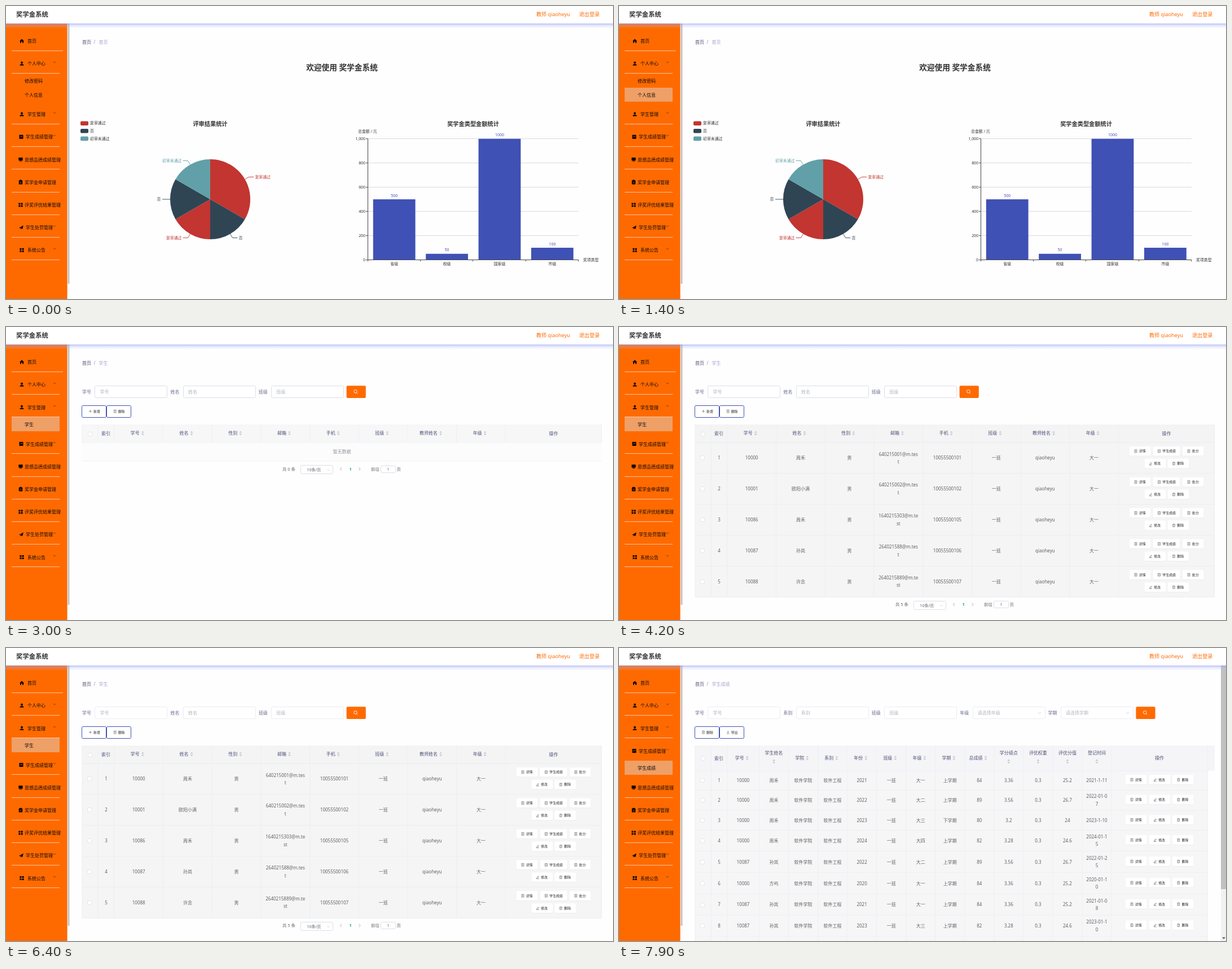
Recreate the animation shown at these times as an HTML page. Size 1076 px wide and 520 px high, loop 8 s.

```html
<!DOCTYPE html>
<html lang="zh-CN">
<head>
<meta charset="utf-8">
<title>奖学金系统</title>
<style>
html,body{margin:0;width:100%;height:100%;overflow:hidden;background:#fefefe}
svg{display:block}
text{font-family:'Noto Sans','Noto Sans CJK SC','Noto Sans CJK',sans-serif;white-space:pre}
</style>
</head>
<body>
<svg id="stage" width="1076" height="520" viewBox="0 0 1076 520"></svg>
<script>
const stage = document.getElementById('stage');
const LOOP = 8000, ORANGE = '#ff6a00', BLUE = '#3f51b5', GREY = '#606266', EDGE = '#dcdfe6', HINT = '#b2b5bc';
const USER = 'qiaoheyu';
const clamp = v => Math.max(0, Math.min(1, v));
const ease = v => { v = clamp(v); return v * v * (3 - 2 * v); };

// Drawing helpers; text is placed by its vertical centre.
const text = (s, x, y, fill = GREY, size = 8, anchor = 'start', weight = 400) =>
  `<text x="${x}" y="${y + size * .37}" fill="${fill}" font-size="${size}" text-anchor="${anchor}" font-weight="${weight}">${s}</text>`;
const mid = (s, x, y, fill, size, weight) => text(s, x, y, fill, size, 'middle', weight);
const end = (s, x, y, fill, size) => text(s, x, y, fill, size, 'end');
const rect = (x, y, w, h, fill, extra = '') =>
  `<rect x="${x}" y="${y}" width="${w}" height="${h}" fill="${fill}" ${extra}/>`;
const path = (d, stroke, width = 1, fill = 'none') =>
  `<path d="${d}" stroke="${stroke}" stroke-width="${width}" fill="${fill}"/>`;
const at = (x, y, s) => `<g transform="translate(${x} ${y})">${s}</g>`;
const chevron = (x, y, c = '#c0c4cc', r = 2.5) => path(`M${x - r} ${y - r / 2}l${r} ${r}l${r} ${-r}`, c, .8);
const crisp = v => Math.floor(v) + .5;
const frame = (x, y, w, h, c = EDGE) => rect(crisp(x), crisp(y), Math.round(w), Math.round(h), '#fff', `rx="2" stroke="${c}"`);
const field = (x, y, w, s, fill = GREY, c = EDGE) => frame(x, y - 10, w, 20, c) + text(s, x + 9, y, fill);

const icons = {
  home: '<path d="M-4 .3L0-3.6 4 .3H3V3.6H1V1H-1V3.6H-3V.3Z"/>',
  user: '<circle cy="-1.7" r="1.9"/><path d="M-3.6 3.4Q-3.6 .8 0 .8T3.6 3.4Z"/>',
  chart: '<path d="M-3.5-3.5h7v7h-7Z"/><path d="M-2 1L-.5-.8 .5.3 2-1.6" stroke="#ff6a00" fill="none"/>',
  screen: '<path d="M-3.6-3.4h7.2v5.2h-7.2ZM-2 2.4h4v1h-4Z"/>',
  board: '<path d="M-3.2-3h1.6v-1h3.2v1h1.6v6.8h-6.4Z"/><path d="M-1.5-.3h3M-1.5 1.6h3" stroke="#ff6a00" stroke-width=".7"/>',
  grid: '<path d="M-3.6-3.4h3v3h-3ZM.6-3.4h3v3h-3ZM-3.6.6h3v3h-3ZM.6.6h3v3h-3Z"/>',
  plane: '<path d="M-3.8.6L3.8-3.6 2.2 3 .2 1.8-1 3.6-1.4 1.2 2-2-2.2 1.2Z"/>'
};
const menu = [
  ['home', '首页', 38], ['user', '个人中心', 38, 1], ['user', '学生管理', 38, 1],
  ['chart', '学生成绩管理', 35, 1], ['screen', '思想品德成绩管理', 33], ['board', '奖学金申请管理', 33],
  ['grid', '评奖评优结果管理', 33], ['plane', '学生处罚管理', 35, 1], ['grid', '系统公告', 38, 1]
];
const subs = { 1: ['修改密码', '个人信息'], 2: ['学生'], 3: ['学生成绩'] };

function sidebar(q) {
  const a = ease((q - 2190) / 310), b = ease((q - 6700) / 400);
  const open = { 1: 1 - a, 2: a * (1 - b), 3: b };
  const lit = {
    修改密码: q < 800 || q >= 1400 ? 0 : q === 800 || q === 1300 ? .5 : 1,
    个人信息: q < 1300 ? 0 : q < 1400 ? .5 : 1,
    学生: q < 2800 ? 0 : q < 2900 ? .5 : 1,
    学生成绩: q < 7200 ? 0 : q < 7300 ? .35 : 1
  };
  let out = rect(0, 31, 108.6, 489, ORANGE) + rect(109.6, 31, 2.9, 462, '#c1c1c1'), shift = 0;
  menu.forEach(([icon, name, x, arrow], k) => {
    const y = 62 + 40.2 * k + shift;
    out += at(x - (x > 36 ? 10 : x > 34 ? 8 : 7), y, icons[icon]) + text(name, x, y + .3, '#0a0a0a');
    if (arrow) out += chevron(86, y - 2.4, '#6b3208', 2.4);
    out += rect(10, Math.round(y + 17), k ? 85 : 91, 1, '#fff', 'opacity=".6"');
    if (!subs[k] || open[k] < .01) return;
    const h = 24.8 * subs[k].length * open[k];
    out += `<svg y="${Math.round(y + 17.3)}" width="108" height="${h + .2}">` + subs[k].map((s, i) =>
      rect(10, 25 * i, 85, 25, '#eea067', `opacity="${lit[s]}"`) +
      text(s, 33, 24.8 * i + 12.8, '#0a0a0a')).join('') + '</svg>';
    shift += h;
  });
  return out;
}

const header = () =>
  rect(0, 31, 1076, 9, 'url(#shade)') + rect(0, 0, 1076, 31, '#fff') +
  text('奖学金系统', 18, 14.5, '#303133', 11.4, 'start', 700) +
  text('教师 ' + USER, 940, 14.5, ORANGE, 9.1) + text('退出登录', 1016, 14.5, ORANGE, 9.1);

const crumb = s => text('首页', 135, 64.5, '#4d5275') + text('/', 155.5, 64.5, '#8d90b5') + text(s, 164.5, 64.5, '#a3a6d0');

function pie(grow) {
  const cx = 362, cy = 343, R = 71, pt = (deg, r) => {
    const a = deg * Math.PI / 180;
    return [cx + r * Math.sin(a), cy - r * Math.cos(a)];
  };
  const red = '#c23531', dark = '#2f4554', teal = '#61a0a8';
  const parts = [[0, 120, red, '复审通过'], [120, 180, dark, '否'], [180, 240, red, '复审通过'], [240, 300, dark, '否'], [300, 360, teal, '初审未通过']];
  let out = '';
  parts.forEach(([a, b, c, name], i) => {
    const r = R + (i ? 0 : grow), p = pt(a, r), e = pt(b, r), m = (a + b) / 2;
    out += path(`M${cx} ${cy}L${p}A${r} ${r} 0 0 1 ${e}Z`, 'none', 0, c);
    const s = pt(m, R), k = pt(m, R + 8), d = m < 180 ? 1 : -1;
    out += path(`M${s}L${k}H${k[0] + d * (m === 270 ? 6 : 9)}`, c, .9);
    out += text(name, k[0] + d * (m === 270 ? 8.5 : 11), k[1] - .3, c, 6.9, d > 0 ? 'start' : 'end');
  });
  [[red, '复审通过'], [dark, '否'], [teal, '初审未通过']].forEach(([c, s], i) => {
    out += rect(132, 204.4 + 13.6 * i, 14, 7.6, c, 'rx="2"') + text(s, 149, 207.8 + 13.6 * i, '#333', 6.9);
  });
  return out + mid('评审结果统计', 362, 209, '#333', 10.2, 700);
}

function bars() {
  const x0 = 641.5, y0 = 450.5, step = 93.4, unit = .2148;
  let out = mid('奖学金类型金额统计', 828, 209, '#333', 10.2, 700) +
    text('总金额 / 元', 624, 222.5, '#333', 6.9) + text('奖项类型', 1023, 450, '#333', 6.9);
  for (let v = 0; v <= 1000; v += 200) {
    const y = Math.round(y0 - v * unit) - .5;
    if (v) out += path(`M${x0} ${y}H1015`, '#dadada');
    out += path(`M638 ${y}H${x0}`, '#555') + end(v.toLocaleString('en-US'), 637, y - .3, '#333', 6.9);
  }
  [['省级', 500], ['校级', 50], ['国家级', 1000], ['市级', 100]].forEach(([s, v], i) => {
    const c = x0 + step * (i + .5), h = v * unit;
    out += rect(c - 37.4, y0 - h, 74.8, h, BLUE) + mid(v, c, y0 - h - 7, BLUE, 7) + mid(s, c, 457.5, '#333', 6.9);
  });
  out += path(`M${x0} 235.5V450.5H1015`, '#444');
  for (let i = 0; i < 5; i++) out += path(`M${Math.round(x0 + step * i) - .5} 450v3.5`, '#555');
  return out;
}

const home = q => crumb('首页') + mid('欢迎使用 奖学金系统', 595.5, 108.5, '#303133', 13.7, 700) +
  pie({ 300: 1.5, 400: 3, 500: 1.5 }[q] || 0) + bars();

function profile(q) {
  const v = s => q < 1700 ? '' : s;
  const row = (label, s, right, y, w = 339) =>
    end(label, right ? 634 : 174.5, y, GREY) + field(right ? 640.5 : 181, y, w, v(s));
  return crumb('个人信息') + row('教师姓名', USER, 0, 116) + row('性别', '男', 1, 116, 128) + chevron(759, 117) +
    row('职称', '一班班主任', 1, 149) + row('电话', '10055500101', 0, 182) + row('邮箱', '640215@m.test', 1, 182) +
    row('班级', '一班', 0, 215) + rect(181, 238, 42, 21, '#06c08f', 'rx="2"') + mid('修 改', 202, 248.3, '#fff', 8, 700);
}

function detail(q) {
  const items = [['学号', '10000', 1], ['姓名', '周禾', 1], ['密码', '123456', 1], ['性别', '男'], ['邮箱', '640215001@m.test'],
    ['手机', '10055500101'], ['班级', '一班'], ['教师姓名', USER], ['年级', '大一']];
  return crumb('学生') + items.map(([s, v, must], i) => {
    const right = i % 2, y = 110.5 + 33.2 * (i >> 1), x = right ? 634 : 168.5;
    return end(s, x, y, GREY) + (must ? end('*', x - 18, y + 1, '#f56c6c') : '') +
      field(right ? 640.5 : 175.5, y, 339, q < 5400 ? s : v, q < 5400 ? HINT : GREY);
  }).join('') + rect(175.6, 266, 49.6, 25, ORANGE, 'rx="2"') + mid('返回', 200.5, 278.5, '#fff');
}

function search(labels, q, picks = 0) {
  const edge = q < 5000 ? EDGE : '#ebecf1';
  let out = labels.map((s, i) => {
    const x = 135 + 156.4 * i, pick = i >= labels.length - picks;
    return text(s, x, 115, '#666a92') + frame(x + 22.8, 104.5, 128, 21, edge) +
      text(pick ? '请选择' + s : s, x + 31.5, 115, HINT) + (pick ? chevron(x + 141, 115.5) : '');
  }).join('');
  const x = 134.8 + 156.4 * labels.length;
  out += rect(x - .4, 104.2, 34.2, 21.8, ORANGE, 'rx="2"') +
    `<circle cx="${x + 15.4}" cy="114.3" r="2.8" fill="none" stroke="#fff" stroke-width=".9"/>` + path(`M${x + 17.4} 116.4l2 2`, '#fff', .9);
  return out;
}

const glyph = {
  详情: 'M-2-2.5h4v5h-4ZM-1-1h2M-1 .7h2', 修改: 'M-2 1.5L1-2 2-1-1 2.2ZM-2.5 2.7h5',
  删除: 'M-2.5-1.7h5M-1-2.6h2M-1.8-1.7v4.3h3.6v-4.3M0-.5v2', 导出: 'M0-2.5v3.5M-1.5-.5L0 1 1.5-.5M-2.3 2.5h4.6', 新增: 'M-2.5 0h5M0-2.5v5'
};
const mark = (s, x, y) => at(x, y, path(glyph[s] || glyph.详情, '#555', .6));
const caption = (s, x, y) => text(s, x, y, '#222', 5.9, 'start', 500);
const tool = (s, i) => frame(134.6 + 43.8 * i, 139, 43, 21, BLUE) + mark(s, 149.5 + 43.7 * i, 149.5) + caption(s, 155 + 43.7 * i, 149.7);
const chip = (s, x, y, w = 37.5) => rect(x, y - 7.6, w, 16.6, '#e9eaed', 'rx="2"') + rect(x, y - 8.4, w, 16.6, '#fff', 'rx="2"') +
  mark(s, x + 11, y) + caption(s, x + 16.8, y);
const box = (x, y) => frame(x - 3.5, y - 3.5, 7, 7, '#e2e4ea');
const sorter = (x, y) => path(`M${x - 2.5} ${y - 1}h5l-2.5-2.7ZM${x - 2.5} ${y + 1}h5l-2.5 2.7Z`, 'none', 0, '#c0c4cc');
const wrapped = (s, x, y, n) => s.length <= n ? mid(s, x, y) : mid(s.slice(0, n), x, y - 6.7) + mid(s.slice(n), x, y + 6.7);

// Header cells; long names may push the sorter below.
function heads(edges, names, y, wrap) {
  return box(149, y + 1) + mid('索引', 177, y + .5, '#4d5275') + names.map((s, i) => {
    const c = (edges[i] + edges[i + 1]) / 2;
    if (wrap && s.length > 3) return mid(s, c, y - 9.5, '#4d5275') + sorter(c, y + 6);
    return mid(s, c - 6.3, y - .6, '#4d5275') + sorter(c - .8 + 4 * s.length, y);
  }).join('');
}
const gridLines = (xs, top, bottom, ys, right) =>
  path(xs.map(x => `M${x} ${top}V${bottom}`).join('') + ys.map(y => `M135 ${y}H${right}`).join(''), '#edeff3', .9);

function pager(n, y) {
  return text(`共 ${n} 条`, 490, y, GREY, 7.4) + frame(522.5, y - 6.3, 56.5, 15.3) + text('10条/页', 533.5, y + 1.6, GREY, 7.1) + chevron(571.5, y + 1.8, '#c0c4cc', 2) +
    path(`M595 ${y - 2.7}l-2.5 2.7l2.5 2.7M625.5 ${y - 2.7}l2.5 2.7l-2.5 2.7`, '#999', .8) + mid('1', 610.5, y, '#0aa57d', 7.2, 700) +
    text('前往', 647, y, GREY, 7.4) + frame(664.5, y - 6, 25.5, 12) + mid('1', 677.5, y, GREY, 7.2) + text('页', 692.5, y, GREY, 7.4);
}

const people = [
  ['10000', '周禾', '640215001@m.test', '10055500101'], ['10001', '欧阳小满', '640215002@m.test', '10055500102'],
  ['10086', '周禾', '1640215303@m.test', '10055500105'], ['10087', '孙岚', '264021588@m.test', '10055500106'],
  ['10088', '许念', '2640215889@m.test', '10055500107']
];
function students(q, full) {
  const edges = Array.from({ length: 9 }, (_, i) => 191.8 + 86.7 * i);
  const bottom = full ? 479.5 : 238, h = 54.85;
  let out = crumb('学生') + search(['学号', '姓名', '班级'], q) + tool('新增', 0) + tool('删除', 1) +
    rect(135, 173, 921, bottom - 173, full ? '#f5f5f5' : '#fcfcfc') + rect(135, 173, 921, 32, full ? '#f4f4f5' : '#f7f7f8') +
    gridLines([135, 163.3, ...edges, 1055.6], 173, full ? bottom : 205, [205, bottom], 1056) +
    heads(edges, ['学号', '姓名', '性别', '邮箱', '手机', '班级', '教师姓名', '年级'], 188.5) + mid('操作', 970.5, 189, '#4d5275');
  if (!full) return out + mid('暂无数据', 595.5, 221, '#909399') + pager(0, 252);
  people.forEach(([id, name, mail, phone], i) => {
    const y = 232.3 + h * i;
    out += path(`M135 ${205 + h * i}H1056`, '#ebedf1', .9) + box(148, y) + mid(i + 1, 177.5, y);
    [id, name, '男', mail, phone, '一班', USER, '大一'].forEach((s, j) => out += wrapped(s, edges[j] + 43.4, y, 15));
    out += chip('详情', 905, y - 12) + chip('学生成绩', 946.5, y - 12, 48) + chip('处分', 999, y - 12) + chip('修改', 931.5, y + 10) + chip('删除', 972.5, y + 10);
  });
  return out + pager(5, 492.5);
}

const marks = [
  ['10000', '周禾', 2021, '大一', 84, '2021-1-11'], ['10000', '周禾', 2022, '大二', 89, '2022-01-07'],
  ['10000', '周禾', 2023, '大三', 80, '2023-1-10'], ['10000', '周禾', 2024, '大四', 82, '2024-01-15'],
  ['10087', '孙岚', 2022, '大二', 89, '2022-01-25'], ['10000', '方屿', 2020, '大一', 84, '2020-01-10'],
  ['10087', '孙岚', 2021, '大一', 84, '2021-01-08'], ['10087', '孙岚', 2023, '大三', 82, '2023-01-10']
];
function scores(q, full) {
  const edges = [191.5, ...Array.from({ length: 13 }, (_, i) => 248.5 + 52.04 * i)];
  const tops = [218, 252.5, 288, 323.5, 360.5, 398.5, 436, 474, 512];
  const mids = [234.7, 270, 306, 341.7, 379.7, 417.6, 455.5, 493];
  const bottom = full ? 520 : 252;
  let out = crumb('学生成绩') + search(['学号', '系别', '班级', '年级', '学期'], q, 2) + tool('删除', 0) + tool('导出', 1) +
    rect(135, 173, 908, bottom - 173, full ? '#f6f6f7' : '#fafafa') + rect(135, 173, 921, 45, '#f5f5f7') +
    gridLines([135, 163.3, ...edges, 1043.5], 173, full ? bottom : 218, full ? tops : [218, 252], 1043) +
    heads(edges, ['学号', '学生姓名', '学院', '系别', '年份', '班级', '年级', '学期', '总成绩', '学分绩点', '评优权重', '评优分值', '登记时间'], 195.3, true) +
    mid('操作', 958, 195.5, '#4d5275');
  if (!full) return out + mid('暂无数据', 589, 235, '#909399');
  marks.forEach(([id, name, year, grade, sum, date], i) => {
    const y = mids[i], term = i === 2 ? '下学期' : '上学期';
    out += box(148, y) + mid(i + 1, 177.5, y);
    [id, name, '软件学院', '软件工程', year, '一班', grade, term, sum, +(sum / 25).toFixed(2), .3, +(sum * .3).toFixed(1), date]
      .forEach((s, j) => out += wrapped(String(s), (edges[j] + edges[j + 1]) / 2, y, 9));
    ['详情', '修改', '删除'].forEach((s, j) => out += chip(s, 898 + 41.4 * j, y - 1));
  });
  return out + rect(1067, 31, 9, 489, '#f1f1f1') + rect(1067, 31, 9, 397, '#c1c1c1') + path('M1069 513.5h6l-3 3Z', 'none', 0, '#505050');
}

function page(q) {
  if (q < 1600) return home(q);
  if (q < 3000) return profile(q);
  if (q < 5300) return students(q, q >= 3200);
  if (q < 6400) return detail(q);
  if (q < 7400) return students(q, true);
  return scores(q, q >= 7700);
}

const defs = '<defs><linearGradient id="shade" x2="0" y2="1"><stop stop-color="#8d98f5" stop-opacity=".6"/>' +
  '<stop offset=".4" stop-color="#a6b0fa" stop-opacity=".3"/><stop offset="1" stop-color="#c0c8ff" stop-opacity="0"/></linearGradient></defs>';
let last = -1, start;
function draw(now) {
  start ??= now;
  const q = Math.floor((now - start) % LOOP / 100) * 100;
  if (q !== last) stage.innerHTML = defs + rect(0, 0, 1076, 520, '#fefefe') + page(q) + sidebar(q) + header();
  last = q;
  requestAnimationFrame(draw);
}
requestAnimationFrame(draw);
</script>
</body>
</html>
```
